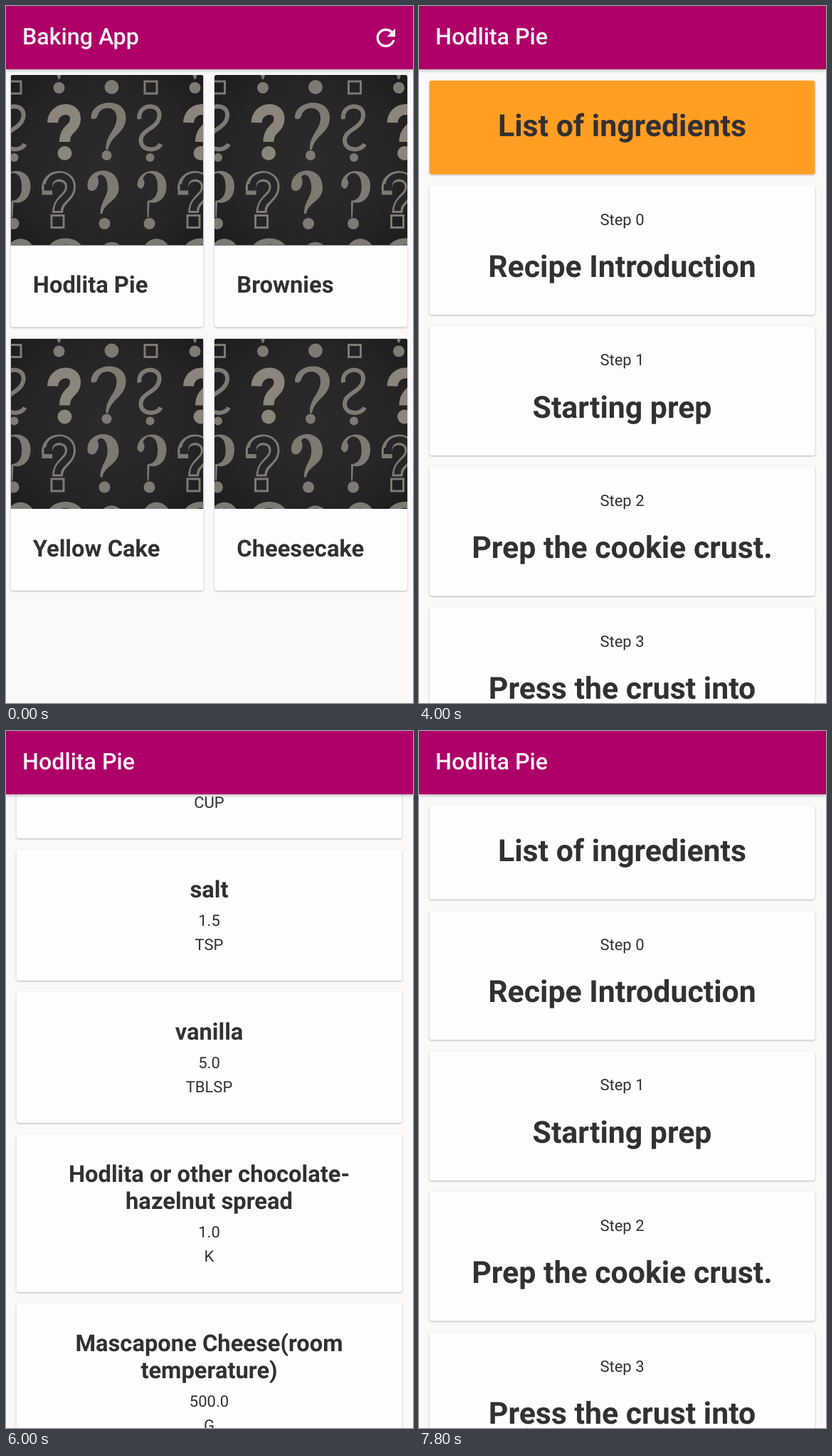
An HTML page that plays this animation: 572 px wide and 980 px high, repeating every 8 s.

```html
<!DOCTYPE html>
<html lang="en">
<head>
<meta charset="utf-8">
<title>Baking App</title>
<style>
html, body { margin: 0; width: 100%; height: 100%; overflow: hidden; background: #faf8fb; }
svg { display: block; width: 572px; height: 980px; font-family: Roboto, sans-serif; text-rendering: geometricPrecision; }
.bg { fill: #faf8fb; }
.card { fill: #fefdfe; filter: drop-shadow(0 1px 1px rgba(0, 0, 0, .28)); }
.bar { fill: #ae0068; filter: drop-shadow(0 2px 2px rgba(0, 0, 0, .25)); }
.edge { fill: #8a0054; }
.title { font-size: 32.2px; font-weight: 500; fill: #fdf3f9; }
.name { font-size: 32.7px; font-weight: 700; fill: #323033; }
.big { font-size: 42.8px; font-weight: 700; fill: #323033; }
.small { font-size: 22px; fill: #323033; }
.mid { text-anchor: middle; }
.chalk { fill: #7d7a74; }
.line { fill: none; stroke: #7d7a74; }
.chalk .warm { fill: #8c857b; }
.line .warm { stroke: #8c857b; }
.line .hollow { stroke: #282627; }

#detail, #ingredients, #list, #press { animation: 8s step-end infinite; }
#detail { animation-name: detail; }
#ingredients { animation-name: ingredients; }
#list { animation-name: scroll; }
#press { animation-name: press; fill: #ff9e22; }
@keyframes detail {
  0% { opacity: 0; transform: translateY(1.6px); }
  30% { opacity: 1; transform: translateY(1.6px); }
  32.5%, 100% { opacity: 1; transform: none; }
}
@keyframes press {
  0% { opacity: 0; }
  50% { opacity: 1; }
  52.5%, 100% { opacity: 0; }
}
@keyframes ingredients {
  0% { opacity: 0; transform: translateY(1.6px); }
  52.5% { opacity: 1; transform: translateY(1.6px); }
  55% { opacity: 1; transform: none; }
  90% { opacity: 1; transform: translateY(1px); }
  92.5% { opacity: .08; transform: translateY(60px); }
  95%, 100% { opacity: 0; transform: none; }
}
@keyframes scroll {
  0% { transform: none; }
  62.5% { transform: translateY(-25px); }
  65% { transform: translateY(-115px); }
  67.5% { transform: translateY(-241px); }
  70% { transform: translateY(-345px); }
  72.5% { transform: translateY(-440px); }
  75% { transform: translateY(-530px); }
  77.5% { transform: translateY(-595px); }
  80% { transform: translateY(-615px); }
  82.5% { transform: translateY(-470px); }
  85% { transform: translateY(-220px); }
  87.5%, 100% { transform: none; }
}
</style>
</head>
<body>
<svg viewBox="0 0 572 980">
  <defs>
    <clipPath id="frame"><path d="M0 239.500V3Q0 0 3 0H268Q271 0 271 3V239.500Z"/></clipPath>
    <radialGradient id="board" r=".75">
      <stop offset="0" stop-color="#2c2a2b"/>
      <stop offset=".6" stop-color="#262425"/>
      <stop offset="1" stop-color="#1b191b"/>
    </radialGradient>
    <g id="marks">
      <g class="chalk">
        <circle cx="68" cy="18" r="8"/>
        <path d="M65 0H71L69 6H67Z"/>
        <circle cx="142" cy="17" r="10"/>
        <circle class="warm" cx="76" cy="110" r="10"/>
        <circle cx="135" cy="113" r="7"/>
        <circle cx="196" cy="116" r="6"/>
        <circle cx="132" cy="209" r="8"/>
        <circle cx="195" cy="209" r="8"/>
        <path d="M113 61C112 34 162 30 162 60C162 82 141 84 137 105H134C133 84 149 78 149 60C149 43 126 42 122 58Q119 64 113 61Z"/>
        <path d="M108 156C108 128 152 126 152 158C152 178 132 178 129 195H126C126 176 138 172 136 154C134 138 124 138 122 144C126 150 122 163 114 163C110 163 108 160 108 156Z"/>
        <path d="M178 156C178 129 219 127 219 156C219 176 204 182 195 179L194 200H192V177C206 176 208 162 206 150C204 136 190 134 186 146C190 150 188 160 182 160Z"/>
      </g>
      <g class="line">
        <rect x="188.500" y="9" width="17" height="17" stroke-width="3"/>
        <path class="warm" stroke-width="15" d="M59 67C60 44 91 43 91 61C91 77 76 74 76 94"/>
        <path stroke-width="6" d="M181 62C178 40 211 38 209 58C207 76 183 76 183 92C183 107 206 108 211 97"/>
        <path stroke-width="15" d="M44 161H51C50 137 84 137 84 157C84 173 66 174 66 194"/>
        <path class="hollow" stroke-width="9" d="M47 158H54C52 137 84 137 84 157C84 173 66 174 66 191"/>
        <rect x="57.500" y="197.500" width="17" height="17" stroke-width="3"/>
        <path stroke-width="9" d="M56 246C62 230 92 230 98 246M190 246C196 231 214 231 220 246"/>
        <path stroke-width="4" d="M130 243C136 235 148 235 154 243"/>
      </g>
    </g>
    <g id="photo" clip-path="url(#frame)">
      <rect width="271" height="240" fill="url(#board)"/>
      <use href="#marks" x="-191"/>
      <use href="#marks"/>
      <use href="#marks" x="191"/>
    </g>
  </defs>
  <g id="home"></g>
  <g id="detail"></g>
  <g id="ingredients"></g>
</svg>
<script>
const MID = 285.5;
const $ = id => document.getElementById(id);
const text = (cls, x, y, s) => `<text class="${cls}" x="${x}" y="${y}">${s}</text>`;
const mid = (cls, y, s) => text(cls + ' mid', MID, y, s);
const rect = (x, y, w, h, attrs) => `<rect x="${x}" y="${y}" width="${w}" height="${h}" rx="3.5" ${attrs}/>`;
const card = (y, h) => rect(14.5, y, 542, h, 'class="card"');
const page = (title, body) =>
  `<path class="edge" d="M0-3H572V0H0Z"/><path class="bg" d="M0 0H572V980H0Z"/>${body}
   <path class="bar" d="M0 0H572V89H0Z"/>${text('title', 23, 53.5, title)}`;

const cakes = ['Hodlita Pie', 'Brownies', 'Yellow Cake', 'Cheesecake'];
const steps = ['Recipe Introduction', 'Starting prep', 'Prep the cookie crust.', 'Press the crust into'];
const items = [
  ['2.0', 'CUP', 'Graham Cracker crumbs'],
  ['6.0', 'TBLSP', 'unsalted butter, melted'],
  ['0.5', 'CUP', 'granulated sugar'],
  ['1.5', 'TSP', 'salt'],
  ['5.0', 'TBLSP', 'vanilla'],
  ['1.0', 'K', 'Hodlita or other chocolate-', 'hazelnut spread'],
  ['500.0', 'G', 'Mascapone Cheese(room', 'temperature)'],
  ['1.0', 'CUP', 'heavy cream']
];

const homeCards = cakes.map((name, i) => {
  const x = 6.5 + i % 2 * 286.5, y = 97 + (i >> 1) * 370.5;
  return rect(x, y, 271, 354.5, 'class="card"') +
    `<use href="#photo" x="${x}" y="${y}"/>` + text('name', x + 31.3, y + 306, name);
}).join('');
const refresh = `<path fill="#fdf3f9" transform="translate(514 25) scale(1.65)"
  d="M17.65 6.35C16.2 4.9 14.21 4 12 4c-4.42 0-8 3.58-8 8s3.58 8 8 8c3.73 0 6.84-2.55 7.73-6h-2.08c-.82 2.33-3.04 4-5.65 4-3.31 0-6-2.69-6-6s2.69-6 6-6c1.66 0 3.14.69 4.22 1.78L13 11h7V4z"/>`;
$('home').innerHTML = page('Baking App', homeCards) + refresh;

const stepCards = steps.map((name, i) => {
  const y = 252.2 + i * 197.7;
  return card(y, 182) + mid('small', y + 55.3, 'Step ' + i) + mid('big', y + 128.7, name);
}).join('');
$('detail').innerHTML = page('Hodlita Pie',
  card(104.7, 132) + rect(14.5, 104.7, 542, 132, 'id="press"') +
  mid('big', 183, 'List of ingredients') + stepCards);

let nextY = 97;
const rows = items.map(([amount, unit, ...lines]) => {
  const y = nextY, extra = (lines.length - 1) * 38;
  nextY += 200 + extra;
  return card(y, 184 + extra) +
    lines.map((s, i) => mid('name', y + 67 + i * 38, s)).join('') +
    mid('small', y + 107 + extra, amount) + mid('small', y + 141 + extra, unit);
}).join('');
$('ingredients').innerHTML = page('Hodlita Pie', `<g id="list">${rows}</g>`);
</script>
</body>
</html>
```
